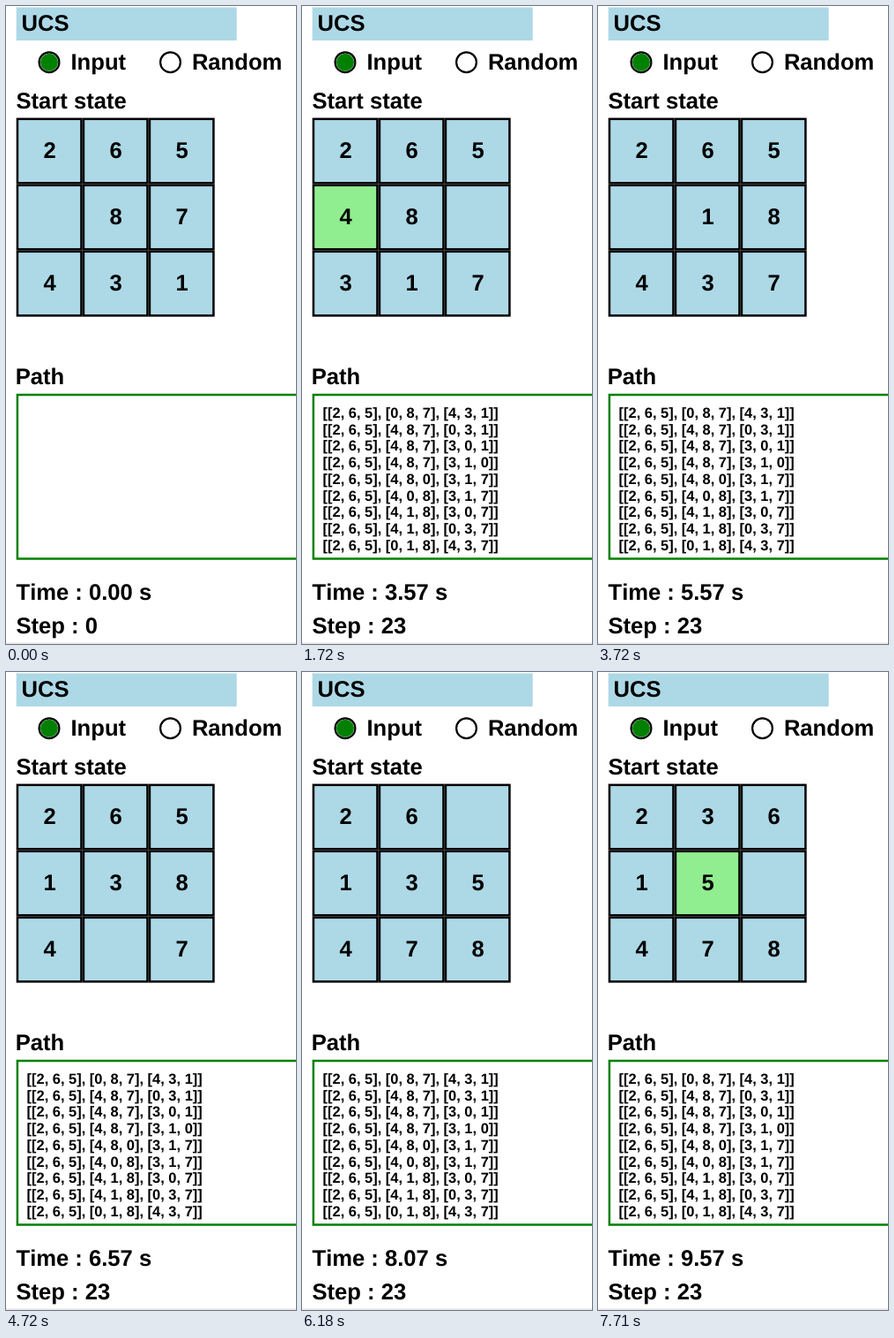
An HTML page for the animation above (8 s loop, 329x722 px).

```html
<!DOCTYPE html>
<html lang="en">
<head>
<meta charset="utf-8">
<title>Sliding puzzle solver</title>
<style>
  html, body { margin: 0; width: 100%; height: 100%; overflow: hidden; background: #fff; }
  svg { display: block; width: 329px; height: 722px; }
  text {
    font: bold 25.6px "Liberation Sans", Arial, sans-serif;
    font-kerning: none;
    text-rendering: geometricPrecision;
    white-space: pre;
  }
  .digit { text-anchor: middle; }
  .ghost { fill: #b5d4dc; }
  .row { font-size: 16.45px; }
  .cell { fill: #add8e6; stroke: #000; stroke-width: 2.5; }
  .home { fill: #90ee90; }
  .radio { fill: #fff; stroke: #000; stroke-width: 2.2; }
  .on { fill: #008000; }
</style>
</head>
<body>
<svg viewBox="0 0 329 722">
  <rect x="11.7" y="1.5" width="250" height="37.5" fill="#add8e6"/>
  <text x="17.5" y="28">UCS</text>
  <circle class="radio" cx="49" cy="63.7" r="11.4"/>
  <circle class="on" cx="49" cy="63.7" r="10"/>
  <text x="73.5" y="72">Input</text>
  <circle class="radio" cx="186.5" cy="63.7" r="11.4"/>
  <text x="210.9" y="72">Random</text>
  <text x="11.5" y="115.5">Start state</text>
  <g id="board"></g>
  <text x="10.8" y="428">Path</text>
  <rect x="12.9" y="440" width="400" height="185.5" fill="#fff" stroke="#008000" stroke-width="2.5"/>
  <g id="path"></g>
  <text id="time" x="11.5" y="671.7"></text>
  <text id="steps" x="11.5" y="709.6"></text>
  <rect y="720.6" width="329" height="1" fill="#d6d6d6"/>
</svg>
<script>
const LOOP = 8000;
const START = [2, 6, 5, 0, 8, 7, 4, 3, 1];
const MOVES = [4, 3, 1, 7, 8, 1, 3, 4, 1, 3, 7, 8, 5, 6, 3, 5];
const TIMES = [270, 730, 1260, 1720, 2260, 2720, 3250, 3720,
               4250, 4720, 5250, 5710, 6180, 6710, 7180, 7710];
const CELL = 75, LEFT = 11.7, TOP = 126.6;

const byId = id => document.getElementById(id);

function add(parent, tag, attrs) {
  const el = document.createElementNS("http://www.w3.org/2000/svg", tag);
  for (const name in attrs) el.setAttribute(name, attrs[name]);
  return parent.appendChild(el);
}

// Each move swaps the named tile with the blank.
const states = [START];
for (const tile of MOVES) {
  const last = states[states.length - 1];
  states.push(last.map(n => n === tile ? 0 : n === 0 ? tile : n));
}

const rowsOf = s => [0, 3, 6].map(i => `[${s.slice(i, i + 3).join(", ")}]`);
const format = s => `[${rowsOf(s).join(", ")}]`;

const cells = START.map((_, i) => {
  const x = LEFT + (i % 3) * CELL, y = TOP + Math.floor(i / 3) * CELL;
  return {
    box: add(byId("board"), "rect", { x: x + 1.25, y: y + 1.25, width: CELL - 2.5, height: CELL - 2.5 }),
    label: add(byId("board"), "text", { x: x + 37.8, y: y + 45.1 })
  };
});

const pathRows = states.slice(0, 9).map((s, i) => {
  const row = add(byId("path"), "text", { class: "row", x: 23.6, y: 465.8 + i * 18.75 });
  row.textContent = format(s);
  return row;
});

function show(step) {
  const solved = step > 0;
  states[step].forEach((n, i) => {
    const { box, label } = cells[i];
    // The first vacated cell keeps a faint trace of its tile.
    const ghost = step === 1 && n === 0;
    box.setAttribute("class", n === i + 1 ? "cell home" : "cell");
    label.setAttribute("class", ghost ? "digit ghost" : "digit");
    label.textContent = ghost ? MOVES[0] : n || "";
  });
  pathRows.forEach(row => row.setAttribute("visibility", solved ? "visible" : "hidden"));
  const seconds = solved ? 2.064 + (step - 1) * 0.5007 : 0;
  byId("time").textContent = `Time : ${seconds.toFixed(2)} s`;
  byId("steps").textContent = `Step : ${solved ? 23 : 0}`;
}

let shown = -1;
const begin = performance.now();

function tick() {
  const t = (performance.now() - begin) % LOOP;
  const step = TIMES.filter(at => at <= t).length;
  if (step !== shown) show(shown = step);
  requestAnimationFrame(tick);
}
tick();
</script>
</body>
</html>
```
